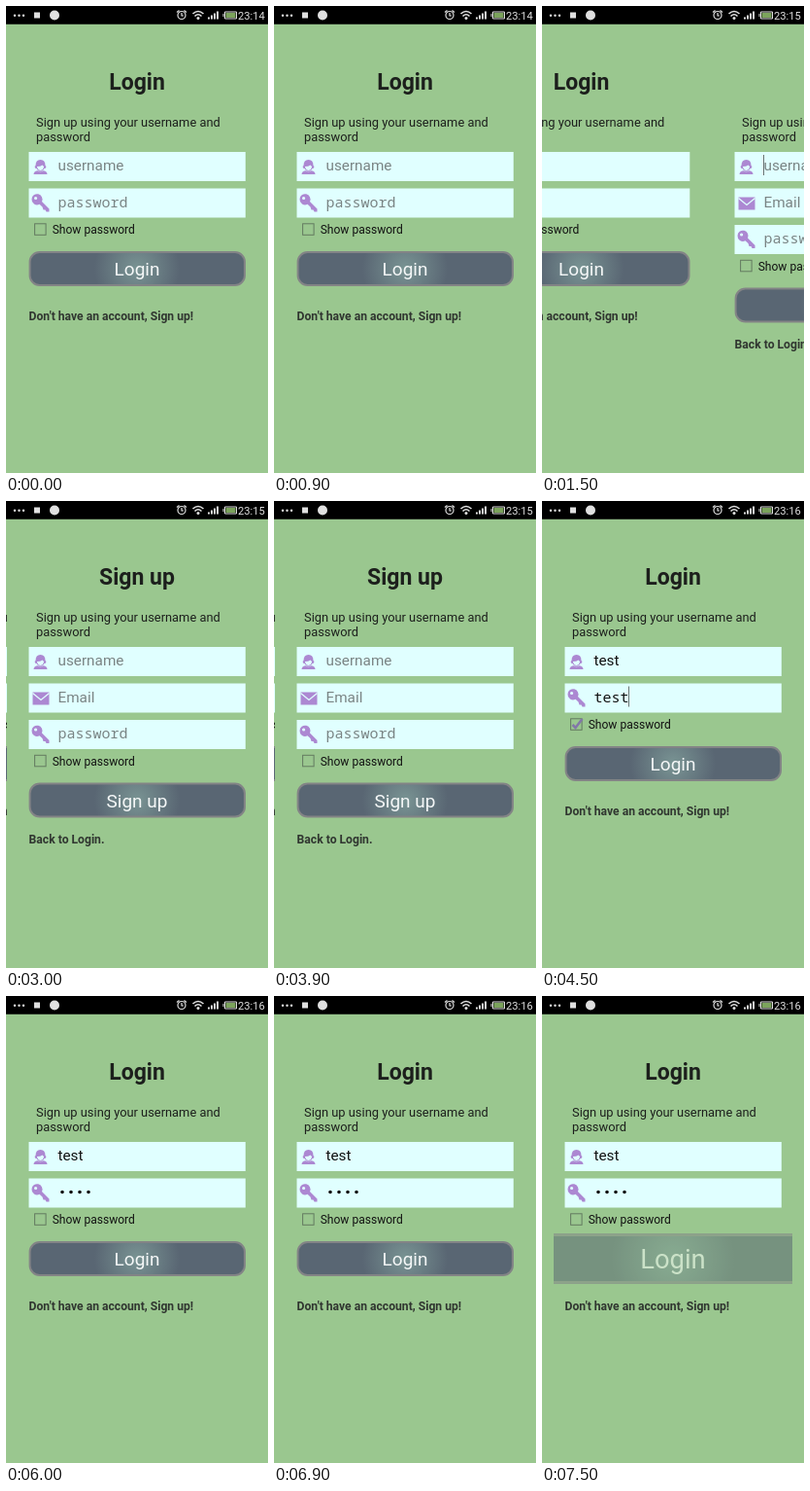
An HTML page with a canvas for the animation above (8 s loop, 270 by 480 pixels).

```html
<!DOCTYPE html>
<html lang="en">
<head>
<meta charset="utf-8">
<title>Login and sign up</title>
<style>
  html, body { margin: 0; width: 100%; height: 100%; overflow: hidden; background: #9ac78f; }
  canvas { display: block; width: 100vw; height: 100vh; }
</style>
</head>
<body>
<canvas></canvas>
<script>
const W = 270, H = 480, LOOP = 8000;
const GREEN = '#9ac78f', FIELD = '#e0ffff', PURPLE = '#ac88d2', INK = '#1c1f1c', HINT = '#7a8484';
const SANS = 'Roboto, sans-serif', MONO = '"Noto Sans Mono", monospace';
const canvas = document.querySelector('canvas');
const ctx = canvas.getContext('2d');

function text(str, x, y, size, color, { weight = 400, family = SANS, align = 'left' } = {}) {
  ctx.font = `${weight} ${size}px ${family}`;
  ctx.textAlign = align;
  ctx.fillStyle = color;
  ctx.fillText(str, x, y);
}

function rect(x, y, w, h, color) {
  ctx.fillStyle = color;
  ctx.fillRect(x, y, w, h);
}

function disc(x, y, r, color) {
  ctx.fillStyle = color;
  ctx.beginPath();
  ctx.arc(x, y, r, 0, 7);
  ctx.fill();
}

function stroke(path, color, width) {
  ctx.strokeStyle = color;
  ctx.lineWidth = width;
  ctx.stroke(new Path2D(path));
}

function fill(path, color) {
  ctx.fillStyle = color;
  ctx.fill(new Path2D(path), 'evenodd');
}

// Draws with the origin moved to x, y.
function at(x, y, draw) {
  ctx.save();
  ctx.translate(x, y);
  draw();
  ctx.restore();
}

function clipped(x, y, w, h, draw) {
  ctx.save();
  ctx.beginPath();
  ctx.rect(x, y, w, h);
  ctx.clip();
  draw();
  ctx.restore();
}

const icons = {
  user() {
    fill('M-5 -1Q-5 -7 0 -7T5 -1L6 0L5 2H-5L-6 0Z', PURPLE);
    fill('M-3.5 0Q0 0 2 -1.5L3.5 0V1Q2.5 4 0 4T-3.5 1Z', FIELD);
    stroke('M-4 1Q-3 4.5 0 4.5T4 1', PURPLE, 1);
    fill('M-7 8Q-7 5 -3 4.2Q0 6.5 3 4.2Q7 5 7 8Z', PURPLE);
  },
  mail() {
    fill('M-8 -6H9V7H-8Z', PURPLE);
    stroke('M-8 -5L0.5 2L9 -5', FIELD, 1.3);
  },
  key() {
    fill('M-9 -4A5.5 5.5 0 1 1 1.5 -1.5L9 6V9H6L5 7H3L2 4L-1 1.3A5.5 5.5 0 0 1 -9 -4ZM-6.5 -5A1.6 1.6 0 1 0 -3.3 -5A1.6 1.6 0 1 0 -6.5 -5Z', PURPLE);
  }
};

function field(y, icon, hint, { value = '', mono = false, cursor = 0, dots = false } = {}) {
  rect(23.5, y, 223.3, 30, FIELD);
  at(35.5, y + 15, icons[icon]);
  if (dots) for (let i = 0; i < 4; i++) disc(58 + i * 9, y + 14, 1.8, '#111');
  else text(value || hint, 53.5, y + 19, mono ? 15 : 15.3, value ? '#111' : HINT, { family: mono ? MONO : SANS });
  if (cursor) rect(cursor, y + 3, 1, 21, '#6a7474');
}

function checkbox(y, checked) {
  ctx.strokeStyle = '#637a60';
  ctx.lineWidth = 1;
  ctx.strokeRect(29.6, y - 6.2, 11.5, 11.5);
  if (checked) stroke(`M31.5 ${y}L34.5 ${y + 3}L41.5 ${y - 6}`, '#8278a8', 2.5);
  text('Show password', 47.7, y + 4, 12.05, '#111');
}

function button(y, label) {
  const glow = ctx.createRadialGradient(135, y, 2, 135, y, 44);
  glow.addColorStop(0, '#789292');
  glow.addColorStop(1, '#596673');
  ctx.beginPath();
  ctx.roundRect(24.6, y - 17, 221.4, 34, 10);
  ctx.fillStyle = glow;
  ctx.fill();
  ctx.strokeStyle = '#838486';
  ctx.lineWidth = 2;
  ctx.stroke();
  text(label, 135, y + 7, 19, '#f4f7f7', { align: 'center' });
}

// Enlarged inside its row and faded towards the background.
function pressedButton(y, label) {
  clipped(12, y - 26, 246, 52, () => {
    ctx.translate(135, y);
    ctx.scale(1.44, 1.44);
    ctx.translate(-135, -y);
    button(y, label);
    ctx.globalAlpha = 0.45;
    rect(0, y - 18, W, 36, GREEN);
  });
}

function heading(title) {
  text(title, 135, 85.6, 23, INK, { weight: 700, align: 'center' });
  text('Sign up using your username and', 31, 124, 12.87, INK);
  text('password', 31, 138.8, 12.87, INK);
}

const footer = (str, y) => text(str, 23.6, y, 12.15, '#303630', { weight: 700 });

function login({ hints = ['username', 'password'], user = '', pass = {}, checked = false, pressed = false } = {}) {
  heading('Login');
  field(150, 'user', hints[0], { value: user });
  field(187.5, 'key', hints[1], { mono: true, ...pass });
  checkbox(230, checked);
  (pressed ? pressedButton : button)(270, 'Login');
  footer("Don't have an account, Sign up!", 323);
}

function signUp(cursor = 0) {
  heading('Sign up');
  field(150, 'user', 'username', { cursor });
  field(187.5, 'mail', 'Email');
  field(225, 'key', 'password', { mono: true });
  checkbox(267.5, false);
  button(307.5, 'Sign up');
  footer('Back to Login.', 352);
}

function statusBar(clock) {
  const white = '#e0e0e0';
  rect(0, 0, W, 18.75, '#000');
  for (const x of [9, 13.5, 18]) disc(x, 9.7, 1.2, white);
  rect(29, 6.5, 6, 6, white);
  disc(50, 9.5, 5, white);
  at(0, -0.5, () => {
    stroke('M185 10A4 4 0 1 1 177 10A4 4 0 1 1 185 10M181 7.5V10.5H183M176 7L178.5 5M183.5 5L186 7', white, 1.2);
    stroke('M192.5 8.5Q198 3.5 203.5 8.5M194.5 11Q198 7.5 201.5 11', white, 1.6);
    disc(198, 13, 1.5, white);
    for (let i = 0; i < 4; i++) rect(208 + i * 3, 12 - i * 2, 2, 2 + i * 2, white);
    stroke('M225.5 6.5H237.5V13.5H225.5ZM224 8.5V11.5', white, 1);
    rect(226.5, 7.5, 10, 5, '#7ba35c');
  });
  text(clock, 239, 14, 11.2, white);
}

const slidingLogin = () => at(-94.5, 0, () => login({ hints: ['', ''] }));
const masked = { dots: true };

const scenes = [
  { clock: '23:14', draw: () => login() },
  { clock: '23:15', draw() { slidingLogin(); at(175, 0, () => signUp(53)); } },
  { clock: '23:15', draw() { clipped(0, 19, 1, H, slidingLogin); signUp(); } },
  { clock: '23:16', draw: () => login({ user: 'test', pass: { value: 'test', cursor: 89 }, checked: true }) },
  { clock: '23:16', draw: () => login({ user: 'test', pass: masked }) },
  { clock: '23:16', draw: () => login({ user: 'test', pass: masked, pressed: true }) }
];

function frame(now) {
  const scene = scenes[Math.floor((now % LOOP) / 1500)];
  const ratio = devicePixelRatio || 1;
  canvas.width = innerWidth * ratio;
  canvas.height = innerHeight * ratio;
  ctx.scale(canvas.width / W, canvas.height / H);
  rect(0, 0, W, H, GREEN);
  scene.draw();
  statusBar(scene.clock);
  requestAnimationFrame(frame);
}
requestAnimationFrame(frame);
</script>
</body>
</html>
```
